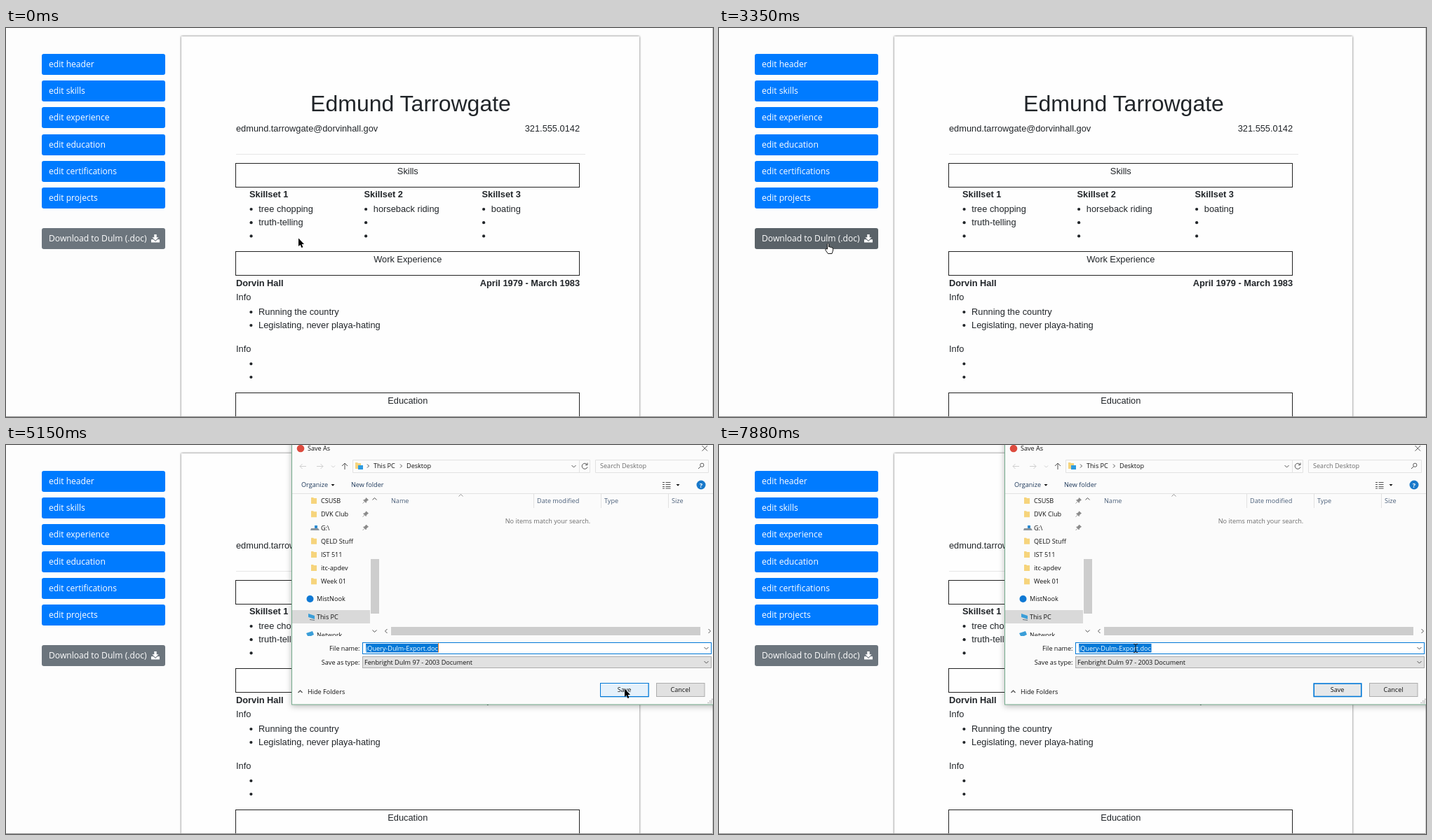
Write an HTML page that moves like this. It is 1008 px wide and 556 px high and loops after 8000 ms.

```html
<!DOCTYPE html>
<html lang="en">
<head>
<meta charset="utf-8">
<title>Resume editor</title>
<style>
html, body { margin: 0; width: 100%; height: 100%; overflow: hidden; background: #fdfdfd; }
svg { display: block; }
text { white-space: pre; }
.resume { font: 12.8px "Liberation Sans", Arial, sans-serif; fill: #212529; }
.name { font-size: 32px; }
.bold { font-weight: bold; }
.mid { text-anchor: middle; }
.end { text-anchor: end; }
.menu { font: 12.1px "Open Sans", sans-serif; fill: #fff; }
.sheet { fill: #fefefe; filter: drop-shadow(0 0 1.6px rgba(0, 0, 0, .65)); }
.frame { fill: none; stroke: #222; }
.window { font: 9.1px "Open Sans", sans-serif; fill: #111; transform-origin: 717px 165px; }
.window .muted { fill: #6d6d6d; }
.window .head { fill: #4c607a; }
.window .tool { fill: #1e395b; }
.line { fill: none; stroke: #555; }
.faint { stroke: #cfcfcf; }
.rule { fill: none; stroke: #e2e2e2; }
.thumb { fill: #cdcdcd; }
.push { fill: #e1e1e1; stroke: #adadad; }
.lit { fill: #e5f1fb; stroke: #0078d7; }

/* one 8 s timeline made of hard steps */
.window, .pointer, .pointer g, .download, .ring, .caret, .save-lit, .combo-lit {
  animation: 8s step-end infinite;
}
.window { animation-name: open; }
.pointer { animation-name: travel; }
.pointer .arrow { animation-name: arrow; }
.pointer .hand { animation-name: hand; }
.pointer .beam { animation-name: beam; }
.download { animation-name: press; }
.ring { animation-name: ring; }
.caret { animation-name: blink; }
.save-lit { animation-name: save; }
.combo-lit { animation-name: combo; }

@keyframes open {
  0% { opacity: 0; transform: scale(.987); }
  62.5% { opacity: .72; transform: scale(.987); }
  64.375%, 100% { opacity: 1; transform: scale(1); }
}
@keyframes travel {
  0% { transform: translate(417px, 301px); }
  16.5% { transform: translate(412px, 301px); }
  20.5% { transform: translate(298px, 312px); }
  25.5% { transform: translate(254px, 323px); }
  27.375% { transform: translate(215px, 331px); }
  34.75% { transform: translate(209px, 327px); }
  36.625% { transform: translate(182px, 299px); }
  38.25% { transform: translate(161px, 308px); }
  40.125% { transform: translate(151px, 308px); }
  41.875% { transform: translate(151px, 307px); }
  45.375% { transform: translate(149px, 310px); }
  48.625% { transform: translate(148px, 310px); }
  60.875% { transform: translate(882px, 349px); }
  81.75% { transform: translate(862px, 345px); }
  83.25% { transform: translate(757px, 329px); }
  84.75% { transform: translate(678px, 327px); }
  86.375% { transform: translate(634px, 323px); }
  91.625% { transform: translate(627px, 309px); }
  93.25% { transform: translate(621px, 289px); }
  95.125% { transform: translate(570px, 284px); }
  96.625% { transform: translate(516px, 284px); }
  98.5%, 100% { transform: translate(591px, 284px); }
}
@keyframes arrow { 0%, 60.875% { opacity: 1; } 36.625%, 93.25%, 100% { opacity: 0; } }
@keyframes hand { 0%, 60.875%, 100% { opacity: 0; } 36.625% { opacity: 1; } }
@keyframes beam { 0% { opacity: 0; } 93.25%, 100% { opacity: 1; } }
@keyframes press {
  0%, 60.875%, 100% { fill: #6c757d; }
  36.625% { fill: #5a6268; }
  59.125% { fill: #545b62; }
}
@keyframes ring { 0%, 62.5%, 100% { opacity: 0; } 59.125% { opacity: 1; } }
@keyframes blink {
  0%, 74.625%, 88.125% { opacity: 1; }
  67.875%, 81.75%, 95.125%, 100% { opacity: 0; }
}
@keyframes save { 0% { opacity: 1; } 83.25%, 100% { opacity: 0; } }
@keyframes combo { 0%, 98.5%, 100% { opacity: 0; } 91.625% { opacity: 1; } }
</style>
</head>
<body>
<svg width="1008" height="556" viewBox="0 0 1008 556">
  <defs>
    <path id="down" class="line" d="M-3-1.5L0 1.5L3-1.5"/>
    <path id="drop" d="M-2.5-1.2H2.5L0 1.5Z"/>
    <path id="folder" fill="#f6d47c" d="M0 0H3L4 1H8V9H0Z"/>
    <path id="pin" fill="#8a8a8a" stroke="#8a8a8a" stroke-width=".8" d="M1-4L4-1L3-.6L1 1.4L.8 3L-3-.8L-1.4-1L.6-3ZM-1.2 1.2L-4 4"/>
  </defs>

  <rect class="sheet" x="250" y="12" width="653" height="560"/>
  <g class="menu" id="menu">
    <rect class="download" x="51" y="286" width="176" height="30" rx="3"/>
    <rect class="ring" x="50" y="285" width="178" height="32" rx="4" fill="none" stroke="#b5babe" stroke-width="2"/>
    <text x="61" y="305.3">Download to Dulm (.doc)</text>
    <path d="M211.3 295H214.7V299.3H217.6L213 303.8L208.4 299.3H211.3ZM207 302.2H210L213 305L216 302.2H219V306.4H207Z"/>
  </g>

  <g class="resume" id="resume">
    <text class="name mid" x="577" y="119">Edmund Tarrowgate</text>
    <text x="328" y="148.3">edmund.tarrowgate@dorvinhall.gov</text>
    <text class="end" x="818" y="148.3">321.555.0142</text>
    <path stroke="#e6e6e6" d="M328 180.5H826"/>
    <text class="bold" x="328" y="369">Dorvin Hall</text>
    <text class="bold end" x="818" y="369">April 1979 - March 1983</text>
    <text x="328" y="389.3">Info</text>
    <text x="328" y="463.3">Info</text>
  </g>
  <path stroke="#949494" d="M0 555.5H1008"/>
  <path stroke="#c8c8c8" d="M1007.5 0V556"/>

  <g class="window">
    <rect x="407.5" y="-20" width="620" height="391" fill="#fbfbfb" stroke="#74ab8c" style="filter:drop-shadow(0 2px 4px rgba(0,0,0,.28))"/>
    <circle cx="420" cy="5" r="5.3" fill="#dd4b3e"/>
    <text x="430" y="8.4">Save As</text>
    <path class="line" d="M992.5 1L1000 8.5M1000 1L992.5 8.5"/>

    <path class="line faint" d="M428 30.5H419M422.5 27L419 30.5L422.5 34M443 30.5H452M448.5 27L452 30.5L448.5 34M464 29.5L466.5 32L469 29.5"/>
    <path class="line" d="M483 35V26M479 30L483 26L487 30"/>
    <path class="rule" fill="#fff" d="M494.5 21.5H832.5V39.5H494.5ZM817.5 21.5V39.5M840.5 21.5H1001.5V39.5H840.5Z"/>
    <use href="#folder" x="498" y="25"/>
    <rect x="502" y="29" width="7" height="6" fill="#2d9be0"/>
    <path class="line" d="M515 27.5L517.5 30L515 32.5M562 27.5L564.5 30L562 32.5"/>
    <text x="524" y="33.4">This PC</text>
    <text x="571" y="33.4">Desktop</text>
    <use href="#down" x="809.5" y="30.5"/>
    <path class="line" d="M828.5 28A4 4 0 1 0 829 31.5M829 25.5V28.5H826"/>
    <text class="muted" x="847" y="33.4">Search Desktop</text>
    <path class="line" d="M990.5 30.5L987 34"/>
    <circle class="line" cx="992.3" cy="28.7" r="2.6"/>

    <text class="tool" x="421" y="60.4">Organize</text>
    <use href="#drop" x="466" y="57.3"/>
    <text class="tool" x="492" y="60.4">New folder</text>
    <path class="line" stroke-dasharray="3 1.5 7 0" d="M936 53.5H947.5M936 56.5H947.5M936 59.5H947.5M936 62H947.5"/>
    <use href="#drop" x="958" y="57.3"/>
    <circle cx="991" cy="57" r="6.5" fill="#1979ca"/>
    <text class="mid" x="991" y="60.5" style="fill:#fff;font-weight:bold">?</text>
    <path class="rule" d="M408 69.5H1008M752.5 70V90M848.5 70V90M944.5 70V90"/>

    <g id="tree"></g>
    <circle cx="433.5" cy="220" r="5" fill="#0f78d4"/>
    <text x="443" y="223.4">MistNook</text>
    <rect x="408" y="236" width="111" height="19" fill="#d9d9d9"/>
    <path fill="#3b9ed8" d="M431 241L440 244V249L431 246Z"/>
    <path stroke="#68737c" d="M433 249.5L440 250.5"/>
    <text x="443" y="249">This PC</text>
    <svg x="408" y="262" width="111" height="11">
      <path fill="#3b9ed8" d="M20 7L29 4L31 9L23 13Z"/>
      <text x="35" y="12.6">Network</text>
    </svg>
    <rect class="thumb" x="520" y="163" width="12" height="78"/>
    <use href="#down" transform="translate(525.5 77) scale(1 -1)"/>
    <use href="#down" x="525.5" y="266"/>

    <g class="head">
      <text x="549" y="83.4">Name</text>
      <text x="757" y="83.4">Date modified</text>
      <text x="853" y="83.4">Type</text>
      <text x="949" y="83.4">Size</text>
    </g>
    <use href="#down" transform="translate(648.5 72) scale(1 -1)" opacity=".6"/>
    <text class="muted mid" x="772.5" y="112.4">No items match your search.</text>
    <rect class="thumb" x="549" y="260" width="441" height="12"/>
    <use href="#down" transform="translate(542 266) rotate(90)"/>
    <use href="#down" transform="translate(1003 266) rotate(-90)"/>

    <text class="end" x="504.5" y="293.6">File name:</text>
    <rect x="508.5" y="282.5" width="497" height="16" fill="#fff" stroke="#0078d7"/>
    <rect x="513" y="284" width="103.5" height="12.5" fill="#0078d7"/>
    <text x="513" y="293.6" style="fill:#fff">jQuery-Dulm-Export.doc</text>
    <rect class="caret" x="616" y="283" width="1" height="13.5" fill="#ff8728"/>
    <use href="#down" x="998.5" y="290.5"/>
    <text class="end" x="504.5" y="313.6">Save as type:</text>
    <rect class="push" x="508.5" y="302.5" width="497" height="16"/>
    <rect class="lit combo-lit" x="508.5" y="302.5" width="497" height="16"/>
    <text x="511" y="313.6">Fenbright Dulm 97 - 2003 Document</text>
    <use href="#down" x="998.5" y="310.5"/>

    <path class="line" stroke-width="1.3" d="M416.5 354L419.5 351L422.5 354"/>
    <text x="430" y="355.8">Hide Folders</text>
    <rect x="848.2" y="341" width="67.6" height="18.5" fill="#e6e8ea" stroke="#0078d7" stroke-width="1.6"/>
    <rect class="lit save-lit" x="847.5" y="340.5" width="68.5" height="19"/>
    <text class="mid" x="881.5" y="353.4">Save</text>
    <rect class="push" x="927.5" y="340.5" width="68.5" height="19"/>
    <text class="mid" x="961.5" y="353.4">Cancel</text>
    <path stroke="#aaa" stroke-width="1.5" stroke-dasharray="1.5 1" d="M1006 363.5H1008M1003 366H1008M1000.5 368.5H1008"/>
  </g>

  <g class="pointer">
    <g class="arrow">
      <path d="M0-.5V11L2.6 8.8L4.4 13L6.4 12.2L4.6 8.1H8Z"/>
    </g>
    <g class="hand">
      <path fill="#fff" stroke="#000" stroke-width=".9" stroke-linejoin="round" d="M3.5 9V1.6Q4.5 0 5.5 1.6V6Q6.8 5 7.5 6.4Q9 5.6 9.5 7Q11.5 6.6 11.5 8.4V11L10 15.5H4.4L.8 10.4Q.6 8.4 2.2 8.6Z"/>
    </g>
    <g class="beam">
      <path fill="none" stroke="#111" d="M0 .5H2L3 1.5L4 .5H6M3 1V12M0 12.5H2L3 11.5L4 12.5H6"/>
    </g>
  </g>
</svg>
<script>
const add = (id, markup) => document.getElementById(id).insertAdjacentHTML("beforeend", markup);
const label = (x, y, text, cls = "") => `<text class="${cls}" x="${x}" y="${y}">${text}</text>`;
const bullet = (x, y, text) =>
  `<circle cx="${x}" cy="${y}" r="2.1"/>` + label(x + 10.7, y + 4, text);

["header", "skills", "experience", "education", "certifications", "projects"].forEach((part, i) => {
  const y = Math.round(36.6 + i * 38.3);
  add("menu", `<rect x="51" y="${y}" width="176" height="30" rx="3" fill="#007bff"/>` +
    label(61, y + 19, "edit " + part));
});

[["Skills", 193.5], ["Work Experience", 319.5], ["Education", 521.5]].forEach(([title, top]) => {
  add("resume", `<rect class="frame" x="327.5" y="${top}" width="490" height="34"/>` +
    label(572.8, top + 15, title, "mid"));
});

[[347, ["tree chopping", "truth-telling", ""]],
 [510.5, ["horseback riding", "", ""]],
 [678.5, ["boating", "", ""]]].forEach(([x, items], col) => {
  add("resume", label(x, 242.3, "Skillset " + (col + 1), "bold") +
    items.map((item, row) => bullet(x + 2.6, 259 + row * 19.2, item)).join(""));
});

[["Running the country", 406], ["Legislating, never playa-hating", 425], ["", 480], ["", 499]]
  .forEach(([text, y]) => add("resume", bullet(349.4, y, text)));

["CSUSB", "DVK Club", "G:\\", "QELD Stuff", "IST 511", "itc-apdev", "Week 01"].forEach((name, i) => {
  const y = 79.6 + i * 19.2;
  const icon = i === 2
    ? `<path fill="#8b959d" d="M435 ${y + 1}H445L447 ${y + 4}H434Z"/><path fill="#2d8bd0" d="M440 ${y - 3}H444V${y + 1}H440Z"/>`
    : `<use href="#folder" x="435" y="${y - 4.5}"/>`;
  const pin = i < 3 ? `<use href="#pin" x="512.5" y="${y}"/>` : "";
  add("tree", icon + label(449, y + 3.5, name) + pin);
});
</script>
</body>
</html>
```
